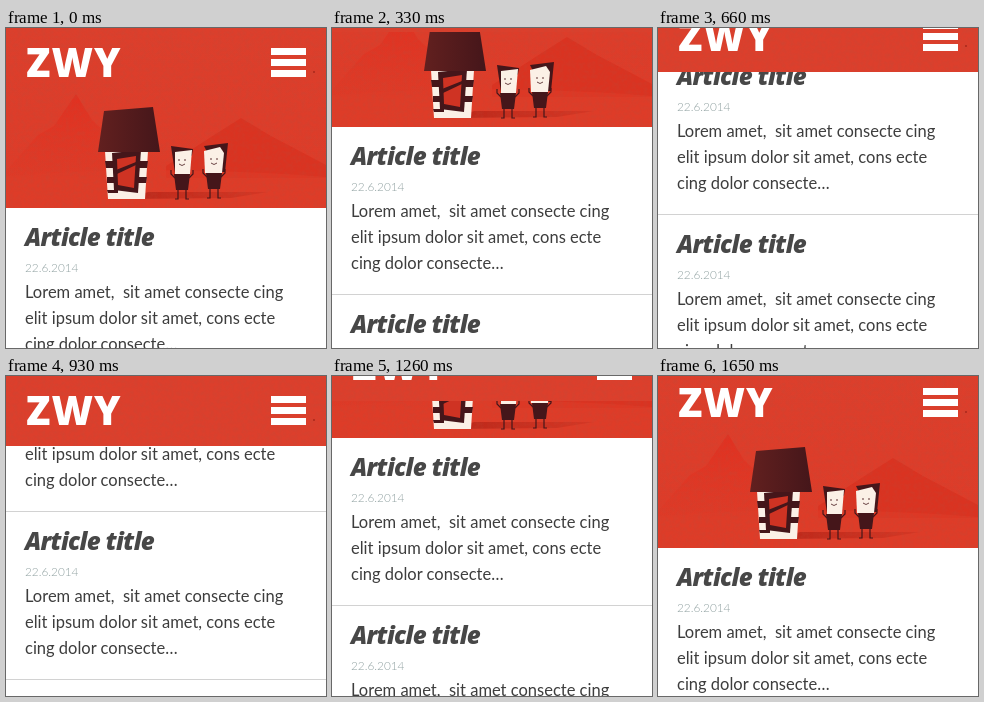
Recreate the animation shown at these times as an HTML page. Size 320 px wide and 320 px high, loop 1680 ms.

```html
<!DOCTYPE html>
<html lang="en">
<head>
<meta charset="utf-8">
<title>Sticky header on scroll</title>
<style>
  html, body { margin: 0; width: 100%; height: 100%; overflow: hidden; background: #fff; }
  svg { display: block; width: 100vw; height: 100vh; }
  text { font-family: Lato, sans-serif; font-variant-ligatures: none; white-space: pre; }
  .brand { font: 800 40px "Open Sans", sans-serif; letter-spacing: 1px; fill: #fff; }
  .title { font: italic 800 24px "Open Sans", sans-serif; letter-spacing: -.6px; fill: #474747; }
  .date { font-size: 11.8px; font-weight: 300; fill: #8fa0a0; }
  .body { font-size: 16.5px; fill: #3d3d3d; }
  .dark { fill: #45161a; }
  .cream { fill: #fbf0e6; }
  .thin { fill: none; stroke: #45161a; stroke-width: 1.2; }
  .smile { fill: none; stroke: #45161a; stroke-width: .8; }
</style>
</head>
<body>
<svg viewBox="0 0 320 320">
  <defs>
    <linearGradient id="sky" x2="0" y2="1">
      <stop offset="0" stop-color="#dc3f2c"/>
      <stop offset="1" stop-color="#de3b28"/>
    </linearGradient>
    <linearGradient id="peak" x2="0" y2="1">
      <stop offset="0" stop-color="#e23020"/>
      <stop offset="1" stop-color="#de3724" stop-opacity=".3"/>
    </linearGradient>
    <linearGradient id="shade">
      <stop offset="0" stop-color="#a5190f" stop-opacity=".6"/>
      <stop offset="1" stop-color="#a5190f" stop-opacity=".15"/>
    </linearGradient>
    <linearGradient id="roof">
      <stop offset="0" stop-color="#62201f"/>
      <stop offset="1" stop-color="#45161a"/>
    </linearGradient>
    <filter id="paper" x="0" y="0" width="1" height="1">
      <feTurbulence type="fractalNoise" baseFrequency=".25" numOctaves="3" seed="4"/>
      <feColorMatrix values="0 0 0 0 .45  0 0 0 0 .08  0 0 0 0 .05  .6 0 0 0 -.22"/>
    </filter>

    <g id="bar">
      <text class="brand" x="20" y="49">ZWY</text>
      <path fill="#fff" d="M265 20h35v7h-35zM265 31h35v7h-35zM265 42h35v7h-35z"/>
      <circle cx="308" cy="44" r=".9" fill="#a3261a"/>
    </g>

    <g id="figure">
      <path class="dark" d="M4 28H20L18 44H6Z"/>
      <path class="thin" d="M8 44V53h-3M16 44V53h3M5 32L1 28V24M19 32L23 28V24"/>
      <path class="smile" d="M9 18Q12 21 15 18"/>
      <circle class="dark" cx="9" cy="14" r=".8"/>
      <circle class="dark" cx="15" cy="14" r=".8"/>
    </g>

    <g id="article">
      <text class="title" x="19" y="218">Article title</text>
      <text class="date" x="19" y="244">22.6.2014</text>
      <g class="body">
        <text x="19" y="270">Lorem amet,  sit amet consecte cing</text>
        <text x="19" y="296">elit ipsum dolor sit amet, cons ecte</text>
        <text x="19" y="322">cing dolor consecte…</text>
      </g>
      <path fill="#d2d2d2" d="M0 347h320v1H0z"/>
    </g>
  </defs>

  <g id="page">
    <rect width="320" height="180" fill="url(#sky)"/>
    <path fill="url(#peak)" d="M0 143L32 107L48 98L70 66L86 92L100 105L128 150H0Z"/>
    <path fill="#d9301e" opacity=".7" d="M160 138L205 109L235 90L265 108L320 137V150H160Z"/>
    <path fill="#df3c28" opacity=".6" d="M0 148Q150 136 320 149V180H0Z"/>
    <path fill="url(#shade)" d="M120 171L142 164L262 164L225 170Z"/>
    <rect width="320" height="180" filter="url(#paper)" opacity=".7"/>

    <path class="cream" d="M99 123H142L139 171H102Z"/>
    <path class="dark" d="M99 133H142L141 140H100ZM101 149H141L140 155H101ZM101 162H112V165H102Z"/>
    <path class="dark" d="M106 125L135 122L132 165L108 162Z"/>
    <path fill="#cf3323" d="M111 131L130 128L128 160L112 157Z"/>
    <path class="dark" d="M110 142L130 134V137L111 146Z"/>
    <path fill="url(#roof)" d="M98 83L147 79L154 124L92 124Z"/>

    <g transform="translate(164 118)">
      <path class="dark" d="M1 0L23 3L22 9L5 27Z"/>
      <path class="cream" d="M5 6L22 4L20 28H5Z"/>
      <use href="#figure"/>
    </g>
    <g transform="translate(196 117)">
      <path class="dark" d="M2 1L26 -2L23 27H15Z"/>
      <path class="cream" d="M2 6L18 2L22 8L20 28H3Z"/>
      <use href="#figure"/>
    </g>
    <use href="#bar"/>

    <use href="#article"/>
    <use href="#article" y="168"/>
    <use href="#article" y="336"/>
  </g>

  <g id="header">
    <rect width="320" height="70" fill="#dc3f2c"/>
    <rect width="320" height="70" filter="url(#paper)" opacity=".7"/>
    <use href="#bar"/>
  </g>
</svg>
<script>
  const LOOP = 1680, TICK = 30;

  // Linear value at a time, from stops of [time in ms, y].
  function valueAt(stops, time) {
    const i = stops.findIndex(([end]) => end > time);
    const [t0, y0] = stops[i - 1], [t1, y1] = stops[i];
    return y0 + (y1 - y0) * (time - t0) / (t1 - t0);
  }

  // Moves in whole pixels, once per tick.
  function slide(id, stops) {
    const frames = [];
    for (let time = 0; time <= LOOP; time += TICK) {
      const y = Math.round(valueAt(stops, time % LOOP));
      frames.push({ offset: time / LOOP, transform: `translateY(${y}px)`, easing: "step-end" });
    }
    document.getElementById(id).animate(frames, { duration: LOOP, iterations: Infinity });
  }

  slide("page", [[0, 0], [900, -220], [LOOP, 0]]);
  slide("header", [[0, -70], [300, -70], [870, 0], [930, 0], [1440, -70], [LOOP, -70]]);
</script>
</body>
</html>
```
